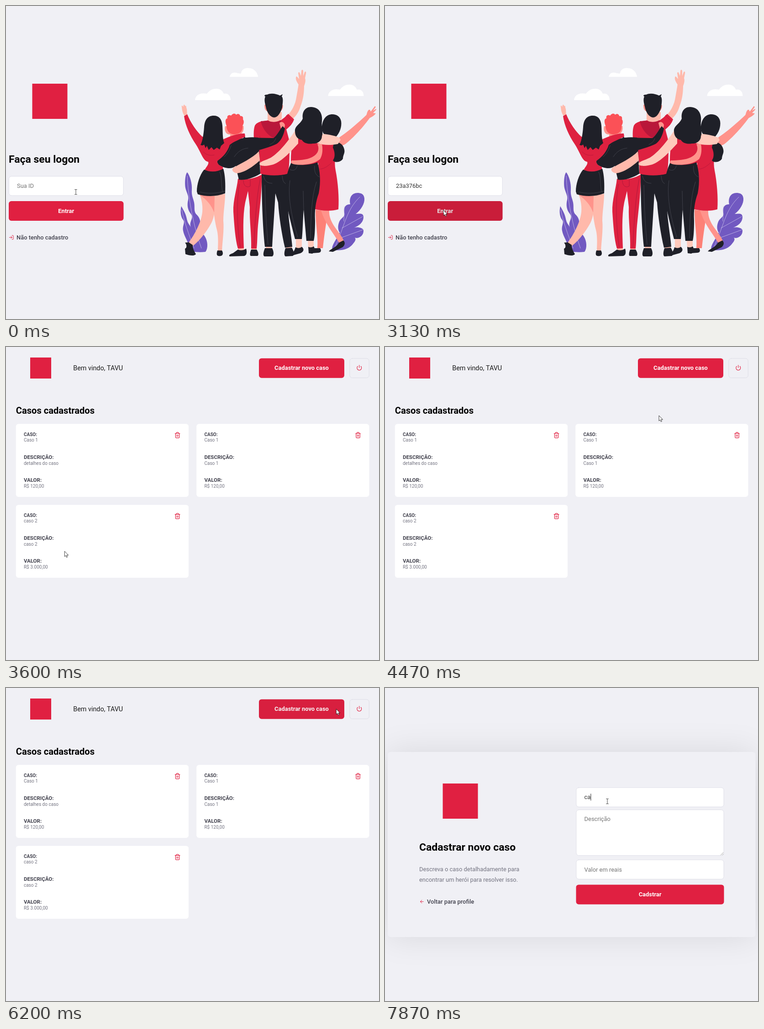
Animation, 817 px wide and 685 px high, one loop 8000 ms. Source, as an HTML page with a canvas:

```html
<!DOCTYPE html>
<html lang="pt-BR">
<head>
<meta charset="utf-8">
<title>Casos</title>
<style>
html, body { margin: 0; width: 100%; height: 100%; overflow: hidden; background: #f0f0f5; }
canvas { display: block; }
</style>
</head>
<body>
<canvas id="stage" width="817" height="685"></canvas>
<script>
const ctx = document.getElementById('stage').getContext('2d');
const LOOP = 8000, STEP = 1000 / 15;
const BG = '#f0f0f5', RED = '#e02041', GREY = '#737380', INK = '#41414d', BORDER = '#dcdce6';
const DARK = '#1f2028', CLOTH = '#de2140', WINE = '#b9173a', HAIR = '#fb5157', PURPLE = '#7159c1';
const SKIN = '#ffb9ab', PINK = '#ff938b', PALE = '#ffc9bb', CORAL = '#fd8177';

const ramp = (t, start, length) => Math.min(1, Math.max(0, (t - start) / length));
const during = (t, from, to) => t >= from && t < to;

// --- drawing helpers ---
function fill(color, ...paths) {
  ctx.fillStyle = color;
  for (const p of paths) ctx.fill(new Path2D(p));
}
function line(color, width, ...paths) {
  ctx.strokeStyle = color;
  ctx.lineWidth = width;
  ctx.lineCap = ctx.lineJoin = 'round';
  for (const p of paths) ctx.stroke(new Path2D(p));
}
function at(x, y, scale, draw) {
  ctx.save();
  ctx.translate(x, y);
  ctx.scale(scale, scale);
  draw();
  ctx.restore();
}
function text(str, x, y, size = 12.9, weight = 400, color = GREY, align = 'left', family = 'Roboto') {
  ctx.font = `${weight} ${size}px ${family}, sans-serif`;
  ctx.fillStyle = color;
  ctx.textAlign = align;
  ctx.fillText(str, x, y);
}
function box(x, y, w, h, color, border) {
  ctx.beginPath();
  ctx.roundRect(x, y, w, h, 5.7);
  ctx.fillStyle = color;
  ctx.fill();
  if (border) {
    ctx.strokeStyle = border;
    ctx.lineWidth = 0.9;
    ctx.stroke();
  }
}
function button(label, x, y, w, shade) {
  box(x, y, w, 43, RED);
  text(label, x + w / 2, y + 25.7, 12.9, 700, '#fff', 'center');
  if (shade > 0) box(x, y, w, 43, `rgba(0,0,0,${0.1 * shade})`);
}
const field = (x, y, w, h) => box(x + .4, y + .4, w - .8, h - .8, '#fff', BORDER);
function caret(x, y) {
  ctx.fillStyle = '#222';
  ctx.fillRect(x, y, 1, 15);
}
function logo(cx, cy, size) {
  ctx.fillStyle = RED;
  ctx.fillRect(cx - size / 2, cy - size / 2, size, size);
}
function icon(x, y, size, ...paths) {
  at(x, y, size / 24, () => line(RED, 2, ...paths));
}
function status(label, w, alpha) {
  if (alpha <= 0) return;
  ctx.globalAlpha = alpha;
  ctx.beginPath();
  ctx.roundRect(0, 669.5, w, 16, [0, 2, 0, 0]);
  ctx.fillStyle = '#35363a';
  ctx.fill();
  text(label, 3.5, 680.8, 8.4, 400, '#c3c6ca', 'left', '"Open Sans"');
  ctx.globalAlpha = 1;
}

// --- illustration ---
function scenery() {
  const cloud = 'M414 206C415 194 426 189 440 192C446 184 453 181 461 181C469 181 474 185 477 192C487 190 492 197 492 206Z';
  fill('#fff', cloud, 'M490 155C492 146 499 144 507 147C512 147 513 149 515 147C516 139 523 135 532 136C544 136 551 146 552 155Z');
  at(291.5, -9, 1, () => fill('#fff', cloud));
  fill(PURPLE,
    'M397 364C393 367 391 385 393 398C395 408 401 415 399 424C396 436 398 447 405 455C412 464 402 470 404 481C406 491 404 510 406 537Q422 540 437 538C443 530 442 515 436 505C431 496 424 493 425 483C427 470 424 462 416 455C411 448 414 440 412 430C410 420 406 415 407 402C408 388 403 372 397 364Z',
    'M384 438C381 450 383 462 388 468C393 474 386 480 388 492C390 504 400 516 404 536L420 538C420 520 410 505 407 490C404 478 399 480 396 466C394 454 388 446 384 438Z',
    'M772 409C757 408 751 420 754 434C744 433 738 442 741 453C743 462 734 463 730 472C726 482 727 490 731 496L722 512C716 522 712 531 716 533C732 537 748 533 757 524C764 516 768 511 764 507C772 510 784 503 783 491C782 485 770 483 762 485C772 482 783 474 783 462C783 452 773 455 766 455C778 446 786 432 785 421C784 412 779 410 772 409Z');
  line('#d9d2f0', 0.7, 'M397 372C399 420 410 480 428 530', 'M385 446C390 470 400 500 412 530',
    'M775 418C752 440 745 465 735 492L720 530', 'M741 438L740 471', 'M781 461L736 486', 'M781 490L729 509');
}

function womanInDress() {
  fill(DARK, 'M676 530L688 530C692 536 689 540 684 540L670 541Z');
  fill(CORAL, 'M678 446C678 480 684 505 682 530L694 530C696 510 700 480 706 448Z');
  fill(PINK, 'M690 447C700 480 720 500 730 519L740 514C733 495 706 476 708 447Z');
  fill(DARK, 'M739 513C744 518 742 524 737 528L716 538L707 537C712 531 725 527 729 518Z');
  fill(PINK, 'M728 289C750 275 775 252 790 238L798 243C785 262 760 290 742 303L729 309Z',
    'M789 240C791 234 792 226 797 227L799 231 808 219 810 221 804 229 811 225 811 227 804 234 810 235C806 241 800 243 797 245Z');
  fill(CLOTH, 'M684 295L729 300C722 320 718 340 722 360C727 385 730 420 728 445C712 450 690 448 672 444C676 410 690 385 684 350Z');
  line(WINE, 0.9, 'M713 343C704 352 696 356 688 357');
  fill(DARK, 'M715 237C702 237 694 247 692 262C691 274 695 282 704 285L722 287C731 278 736 264 734 252C732 242 724 237 715 237Z',
    'M718 298C727 296 739 302 741 314C743 322 738 326 738 334C734 342 720 344 716 338C722 330 720 318 716 310Z');
}

function tallMan() {
  fill(SKIN, 'M569 524H582V534H569Z', 'M613 524L625 523 627 533H613Z');
  fill(DARK, 'M560 365C580 372 600 371 619 366C622 400 616 430 619 460C622 490 626 510 627 527L611 529C604 500 598 460 596 430L590 410C588 450 585 490 583 527L567 527C562 480 560 420 560 365Z',
    'M567 530L583 530C587 538 587 546 583 548L566 548C562 546 564 538 567 530Z',
    'M612 530L626 529C631 537 632 545 628 547L612 548C608 545 610 537 612 530Z');
  line('#484954', 0.8, 'M564 372C567 384 573 388 583 388', 'M605 372C606 384 609 389 617 390', 'M567 392C568 440 570 480 574 522');
  fill(SKIN, 'M616 240C626 230 634 215 636 200C638 188 640 178 641 170L653 173C653 190 651 205 645 220C641 233 635 241 627 248Z',
    'M641 172C636 165 633 158 636 154C639 155 640 158 642 160L640 147C641 144 643 144 644 148L646 153 647 142C648 138 651 139 651 143L651 153 654 145C656 142 658 144 657 148L655 158C657 163 655 170 653 175Z');
  fill(CLOTH, 'M545 262C550 252 565 252 575 250L602 250Q611 244 618 236L631 248C628 257 622 264 614 270L622 300C620 330 622 350 617 367C600 372 575 372 557 367C558 340 553 320 553 310L544 300C542 285 542 270 545 262Z');
  line(WINE, 0.9, 'M614 239L626 251', 'M556 285V318');
  fill(WINE, 'M558 252L602 250C606 262 600 278 590 290C575 286 562 270 558 252Z');
  fill(SKIN, 'M573 232H604V245C604 254 578 257 573 249Z');
  fill(PINK, 'M566 216Q565 228 573 231L600 231Q607 228 607 217Z');
  fill(DARK, 'M568 198C564 196 567 194 572 194C580 190 592 192 600 196L606 193 604 198C608 202 606 212 605 222C602 232 596 244 587 244C578 243 571 232 569 220C567 212 565 205 568 198Z');
}

function redHairedMan() {
  fill(SKIN, 'M509 526H521V535H509Z', 'M538 526H549V535H538Z');
  fill(CLOTH, 'M508 378C520 382 545 378 560 369C561 400 556 440 553 470C550 495 551 515 549 531L537 531C538 500 533 470 534 440L530 405 524 430C518 460 520 500 521 530L508 531C502 510 500 480 498 450C497 425 506 400 508 378Z');
  line('#a5163a', 0.8, 'M520 382C520 396 530 398 535 394V380', 'M557 378C548 420 545 480 543 528', 'M511 390C504 430 507 490 513 528');
  fill(DARK, 'M508 533Q517 537 526 531C528 538 528 545 522 547L490 548C487 546 490 543 497 541Z',
    'M537 533L549 533C553 539 554 545 551 547L536 547C533 545 535 538 537 533Z',
    'M490 300C505 290 530 285 553 288L557 367C540 378 520 382 510 380L503 350C495 358 480 356 466 348C461 342 462 338 467 334C478 325 486 310 490 300Z');
  fill(PINK, 'M599 256C603 251 610 255 611 261L609 270 602 268Z');
  fill(DARK, 'M522 284L524 288 586 289C595 282 600 270 606 263L611 268C608 285 600 300 588 304C570 312 550 315 530 324L500 340Z');
  line('#484954', 0.8, 'M500 330C508 318 518 312 530 311', 'M478 330C487 322 491 312 493 305', 'M578 303C586 300 589 295 591 290');
  fill(SKIN, 'M554 318C540 333 515 344 498 354C493 358 497 365 506 366C525 364 545 348 556 338Z');
  fill(PINK, 'M491 268H515V282C512 291 497 293 491 287Z', 'M480 263C478 270 480 280 488 281H512C519 279 522 270 520 262Z');
  fill(HAIR, 'M483 262C479 252 481 246 485 246C483 240 489 237 493 240C496 235 502 234 504 238C509 234 513 238 513 241C519 240 520 245 519 248C522 252 521 258 518 262C519 272 514 280 501 281C489 281 483 273 483 262Z');
}

function longHairedWoman() {
  fill(SKIN, 'M424 412C431 430 432 448 428 462C424 480 410 505 400 518L408 526C424 515 446 485 452 470C458 455 458 435 458 416Z',
    'M452 416C454 450 458 475 462 490C466 506 464 525 464 537L473 537C474 515 478 490 476 470C476 450 480 430 480 411Z',
    'M394 243C388 238 386 232 385 221C384 217 387 217 388 221L389 217C390 215 392 216 392 219C394 217 395 219 395 223C397 226 396 232 397 238Z');
  fill(PINK, 'M424 413L457 416 456 452C450 436 440 424 424 413Z');
  fill(DARK, 'M400 517L409 523C408 530 413 538 416 543C412 548 402 546 393 543L392 531C397 530 396 521 392 518Z',
    'M463 535L473 535C476 540 476 546 470 547C462 548 460 545 463 535Z');
  fill(CLOTH, 'M390 241L397 237C404 255 418 275 430 286L475 292C492 284 510 278 523 279L524 286C512 292 498 297 490 304C486 318 476 330 463 339C462 344 466 349 475 352L475 359C462 366 446 366 434 361C438 352 445 347 443 341C432 340 428 322 416 303C403 284 393 262 390 241Z');
  fill(DARK, 'M434 358C424 370 418 390 418 406L420 412C440 418 462 417 480 410C481 390 480 370 476 356C462 364 446 364 434 358Z');
  line(WINE, 0.9, 'M432 319C438 326 447 328 456 326');
  line('#484954', 0.8, 'M425 407C440 411 460 411 479 405', 'M468 363C473 372 471 390 474 406');
  fill(DARK, 'M455 240C441 240 435 250 434 265C433 280 430 298 426 304C430 306 432 305 434 303L437 311 440 306 444 315 450 309 455 315 462 310 468 314 471 306 478 300C474 290 475 275 474 262C473 248 467 240 455 240Z');
}

function curlyWoman() {
  fill(PALE, 'M635 508H648V531H635Z', 'M661 510H674V530H662Z');
  fill(CLOTH, 'M632 283L692 285C694 300 690 330 683 345C660 350 640 349 624 345C624 325 624 310 632 283Z');
  fill(DARK, 'M624 344C640 349 665 349 682 342C688 360 690 385 685 410C678 430 676 445 677 470C677 490 676 505 674 514L658 514C656 490 654 470 652 445C650 470 650 495 648 510L633 510C628 490 620 460 614 430C610 400 612 370 624 344Z',
    'M634 528Q642 532 648 527C654 532 652 538 645 541L627 546C624 542 632 538 634 528Z',
    'M662 527Q668 530 674 526C678 532 676 539 671 542L663 541Z');
  line('#484954', 0.8, 'M622 358C630 362 636 358 638 350', 'M676 350C674 366 682 373 687 374', 'M622 382C616 420 628 470 639 506', 'M680 385C668 420 668 470 667 508', 'M652 445L651 405');
  fill(PALE, 'M633 273C622 290 600 320 580 332C568 338 556 340 555 346C558 352 575 350 585 347C605 340 625 317 640 301V280Z',
    'M676 280C695 278 715 282 730 288L733 293 727 302C712 305 695 305 680 300Z');
  fill(PINK, 'M682 302C688 315 682 325 670 331C658 337 640 338 626 338C622 342 625 346 635 347C650 349 676 346 688 335C694 325 694 312 692 302Z');
  fill(DARK, 'M668 221C655 221 648 232 650 246C646 258 632 262 633 274C633 286 640 292 648 293C652 300 662 303 672 301C682 302 692 295 692 285C696 275 690 265 692 252C694 235 685 221 668 221Z');
}

// --- pages ---
function logonPage(t) {
  logo(96, 208.5, 77);
  text('Faça seu logon', 6, 343.3, 22.94, 700, '#000');
  field(6, 372.3, 251.5, 43);
  const typed = t >= 2130;
  text(typed ? '23a376bc' : 'Sua ID', 24, 398.2, 12.9, 400, typed ? '#333' : '#757575');
  if (during(t, 930, 1400) || during(t, 1930, 2130)) caret(24, 386.5);
  if (during(t, 2130, 2660)) caret(81, 386.5);
  button('Entrar', 6, 427, 251.5, ramp(t, 2500, 200));
  icon(6, 500.7, 11.5, 'M15 3h4a2 2 0 0 1 2 2v14a2 2 0 0 1-2 2h-4', 'M10 17L15 12 10 7', 'M15 12H3');
  text('Não tenho cadastro', 23, 511, 12.9, 500, INK);
  scenery();
  womanInDress();
  tallMan();
  redHairedMan();
  longHairedWoman();
  curlyWoman();
}

function caseCard(x, y, title, details, value) {
  box(x, y, 378.3, 159.6, '#fff');
  const rows = [['CASO:', title, 26.7, 10, 39], ['DESCRIÇÃO:', details, 76.4, 11.5, 89.5], ['VALOR:', value, 126.9, 11.5, 140]];
  for (const [label, content, labelY, size, contentY] of rows) {
    text(label, x + 17.2, y + labelY, size, 700, INK);
    text(content, x + 17.2, y + contentY, 10.04);
  }
  icon(x + 346.7, y + 17.4, 14.3, 'M3 6H21',
    'M19 6v14a2 2 0 0 1-2 2H7a2 2 0 0 1-2-2V6m3 0V4a2 2 0 0 1 2-2h4a2 2 0 0 1 2 2v2', 'M10 11V17', 'M14 11V17');
}

function profilePage(t) {
  logo(76, 46, 46);
  text('Bem vindo, TAVU', 147.3, 51, 14.35, 400, '#1a1a1a');
  const shade = ramp(t, 4690, 200) - ramp(t, 5300, 200) + ramp(t, 6130, 200);
  button('Cadastrar novo caso', 554, 24.7, 187, shade);
  box(752.8, 25.1, 42.6, 42.4, BG, during(t, 5900, 6130) ? '#999' : BORDER);
  icon(767.2, 38.6, 13.2, 'M18.36 6.64a9 9 0 1 1-12.73 0', 'M12 2V12');
  text('Casos cadastrados', 21.8, 146, 20.08, 700, '#000');
  caseCard(21.7, 168.3, 'Caso 1', 'detalhes do caso', 'R$ 120,00');
  caseCard(417.2, 168.3, 'Caso 1', 'Caso 1', 'R$ 120,00');
  caseCard(21.7, 345.4, 'caso 2', 'caso 2', 'R$ 3.000,00');
  status('Conectando...', 270.5, 1 - ramp(t, 3400, 200));
}

function newCasePage(t) {
  ctx.save();
  ctx.shadowColor = 'rgba(0,0,0,.1)';
  ctx.shadowBlur = 72;
  box(6, 140, 805.5, 405, BG);
  ctx.restore();
  logo(165, 247.5, 77);
  text('Cadastrar novo caso', 75, 356.3, 22.94, 700, '#000');
  text('Descreva o caso detalhadamente para', 75, 400.8);
  text('encontrar um herói para resolver isso.', 75, 423.8);
  icon(75, 461.8, 11.5, 'M19 12H5', 'M12 19L5 12 12 5');
  text('Voltar para profile', 92, 472, 12.9, 500, INK);

  field(418.5, 217.6, 324, 43);
  field(418.5, 266.2, 324, 100.8);
  field(418.5, 375.7, 324, 43);
  const typed = t >= 7860 ? 'ca' : t >= 7730 ? 'c' : '';
  text(typed || 'Titulo do caso', 436.6, 243.3, 12.9, 400, typed ? '#333' : '#757575');
  if (during(t, 7130, 7660) || typed) caret(436.6 + (typed ? ctx.measureText(typed).width : 0), 231.3);
  text('Descrição', 436.6, 291.4, 12.9, 400, '#757575');
  text('Valor em reais', 436.6, 401.6, 12.9, 400, '#757575');
  line('#777', 0.7, 'M735.5 365.5L741 360', 'M739 365.5L741 363.5');
  button('Cadstrar', 418.5, 430.4, 324, 0);
  status('localhost:3000/incidents/new', 119.5, 0.42 * (1 - ramp(t, 6470, 130)));
}

// --- pointer: time, x, y ---
const route = [
  [0, 153, 407], [133, 149.5, 401], [200, 149.5, 401], [333, 147.5, 399.5], [467, 147.5, 399.5],
  [533, 147.5, 398.5], [600, 147.5, 398.5], [733, 146.5, 397.5], [2333, 146.5, 397.5], [2600, 134, 436], [2800, 128, 447],
  [3800, 128, 447], [4000, 180, 422], [4267, 440, 252], [4467, 600, 150], [4667, 633, 88],
  [4733, 637, 66], [4933, 645, 46], [5267, 572, 56], [5400, 474, 178], [5467, 471, 198], [5533, 490, 198],
  [5733, 610, 130], [5933, 762, 56], [6067, 770, 46], [6333, 676, 46], [6400, 672, 47], [6467, 672, 47],
  [6667, 630, 105], [6933, 515, 228], [7133, 487, 248], [8000, 487, 248]
];
function pointer(t) {
  const i = Math.max(1, route.findIndex(p => p[0] >= t));
  const [a, b] = [route[i - 1], route[i]];
  const k = ramp(t, a[0], b[0] - a[0]);
  const x = a[1] + (b[1] - a[1]) * k, y = a[2] + (b[2] - a[2]) * k;
  const overField = t < 3190 ? y < 415 : t >= 6460 && y > 217 && x > 418;
  at(x, y, 1, () => {
    if (overField) {
      line('#333', 0.9, 'M-2.3 -5.5H-.8L0 -4.8 .8 -5.5H2.3', 'M0 -5V5', 'M-2.3 5.5H-.8L0 4.8 .8 5.5H2.3');
    } else {
      const arrow = 'M.3 .3V11.6L2.9 9.3 4.7 13.4 6.6 12.5 4.9 8.6H8.3Z';
      fill('#fff', arrow);
      line('#111', 0.8, arrow);
    }
  });
}

function frame(now) {
  const t = Math.floor((now % LOOP + 5) / STEP) * STEP;
  ctx.fillStyle = BG;
  ctx.fillRect(0, 0, 817, 685);
  (t < 3190 ? logonPage : t < 6460 ? profilePage : newCasePage)(t);
  pointer(Math.min(t, LOOP));
  requestAnimationFrame(frame);
}
requestAnimationFrame(frame);
</script>
</body>
</html>
```
